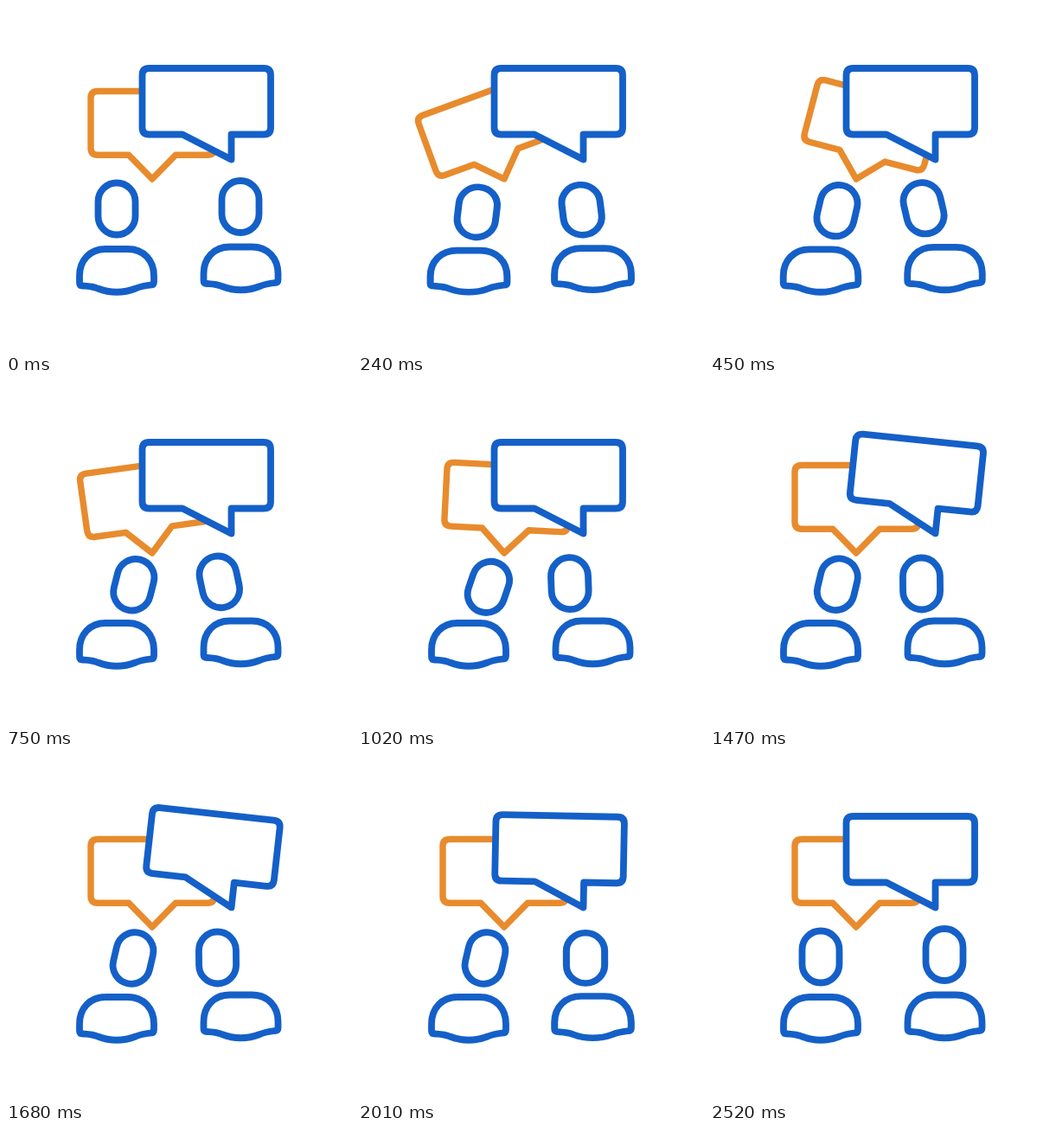
An HTML page for the animation above (3.55 s loop, 400 px wide and 400 px high).

```html
<!DOCTYPE html>
<html lang="en">
<head>
<meta charset="utf-8">
<title>Conversation</title>
<style>
  html, body { margin: 0; width: 100%; height: 100%; overflow: hidden; background: #fff; }
  svg { display: block; width: 100%; height: 100%; }
</style>
</head>
<body>
<svg viewBox="0 0 400 400" fill="#fff" stroke="#1460c8" stroke-width="7.8" stroke-linecap="round" stroke-linejoin="round">
  <defs>
    <rect id="head" x="-21.5" y="-30" width="43" height="60" rx="21.5"/>
    <path id="body" d="M85 312C85 294 97 281 115 281H141C159 281 171 294 171 312V319Q171 322.5 167 322.5C159 323.5 156 324 150 326.5Q128 335 106 326.5C100 324 97 324 89 323.5Q85 323.5 85 320Z"/>
  </defs>
  <path id="orange" stroke="#e88b2d" stroke-width="7.4" d="M106 98.5H233Q241 98.5 241 106.5V164Q241 172.3 233 172.3H196L169 200L142 172.3H106Q98 172.3 98 164V106.5Q98 98.5 106 98.5Z"/>
  <path id="blue" d="M165.5 72H298Q306 72 306 80V140.5Q306 148.5 298 148.5H260.5V177.5L204 148.5H165.5Q157.5 148.5 157.5 140.5V80Q157.5 72 165.5 72Z"/>
  <g id="left"><use href="#body"/><use id="leftHead" href="#head"/></g>
  <g id="right"><use href="#body" x="143.5" y="-2.5"/><use id="rightHead" href="#head"/></g>
</svg>
<script>
const LOOP = 3550, STEP = 30, LAST = 2520, MOVE = 480;
const $ = id => document.getElementById(id);
const place = (id, transform) => $(id).setAttribute("transform", transform);
const clamp = u => Math.min(1, Math.max(0, u));

// Cubic timing curve, solved for x by bisection
function bezier(x1, y1, x2, y2) {
  const at = (a, b, s) => 3 * a * s * (1 - s) ** 2 + 3 * b * s * s * (1 - s) + s ** 3;
  return u => {
    let lo = 0, hi = 1;
    for (let i = 0; i < 24; i++) {
      const mid = (lo + hi) / 2;
      if (at(x1, x2, mid) < u) lo = mid; else hi = mid;
    }
    return at(y1, y2, (lo + hi) / 2);
  };
}
const ease = bezier(.25, .1, .25, 1);
const easeInOut = bezier(.42, 0, .58, 1);

// Five beats, alternating sides and losing 5 degrees each time
function swing(t, start, beat) {
  const peak = i => i === 0 ? 0 : (-1) ** i * (25 - 5 * i);
  const u = Math.min(4.9999, Math.max(0, (t - start) / beat));
  const i = Math.floor(u);
  return peak(i) + (peak(i + 1) - peak(i)) * ease(u - i);
}

// Rises from 0 to 1 at one time and falls back at another
function pulse(t, up, down) {
  const step = start => easeInOut(clamp((t - start) / MOVE));
  return step(up) - step(down);
}

// Each person leans in, nods, then returns; lean and nod are [x, y, angle]
const people = [
  { id: "left", foot: [128, 332], rest: [128, 234.5, 0], back: 2040,
    lean: [19, 1.5, 13], nod: [4, 3.5, 6], nodUp: 600, nodDown: 1080 },
  { id: "right", foot: [271, 329.5], rest: [271, 232, 0], back: 1710,
    lean: [-24, 1.2, -13], nod: [-2.5, 2.3, 12.5], nodUp: 660, nodDown: 1710 }
];

function drawPerson(p, t) {
  const lean = pulse(t, 0, p.back), nod = pulse(t, p.nodUp, p.nodDown);
  const [x, y, a] = p.rest.map((v, k) => v + lean * p.lean[k] + nod * p.nod[k]);
  const dip = start => .032 * Math.sin(Math.PI * clamp((t - start) / MOVE));
  const s = dip(0) + dip(p.back), [fx, fy] = p.foot;
  place(p.id + "Head", `translate(${x} ${y}) rotate(${a})`);
  place(p.id, `translate(${fx} ${fy}) scale(${1 + s} ${1 - s}) translate(${-fx} ${-fy})`);
}

function draw(t) {
  place("orange", `rotate(${swing(t, 0, 240)} 169 200)`);
  place("blue", `rotate(${swing(t, 1080, 270)} 261 178)`);
  people.forEach(p => drawPerson(p, t));
}

const began = performance.now();
function tick() {
  const t = (performance.now() - began) % LOOP;
  draw(Math.min(Math.floor(t / STEP) * STEP, LAST));
  requestAnimationFrame(tick);
}
tick();
</script>
</body>
</html>
```
